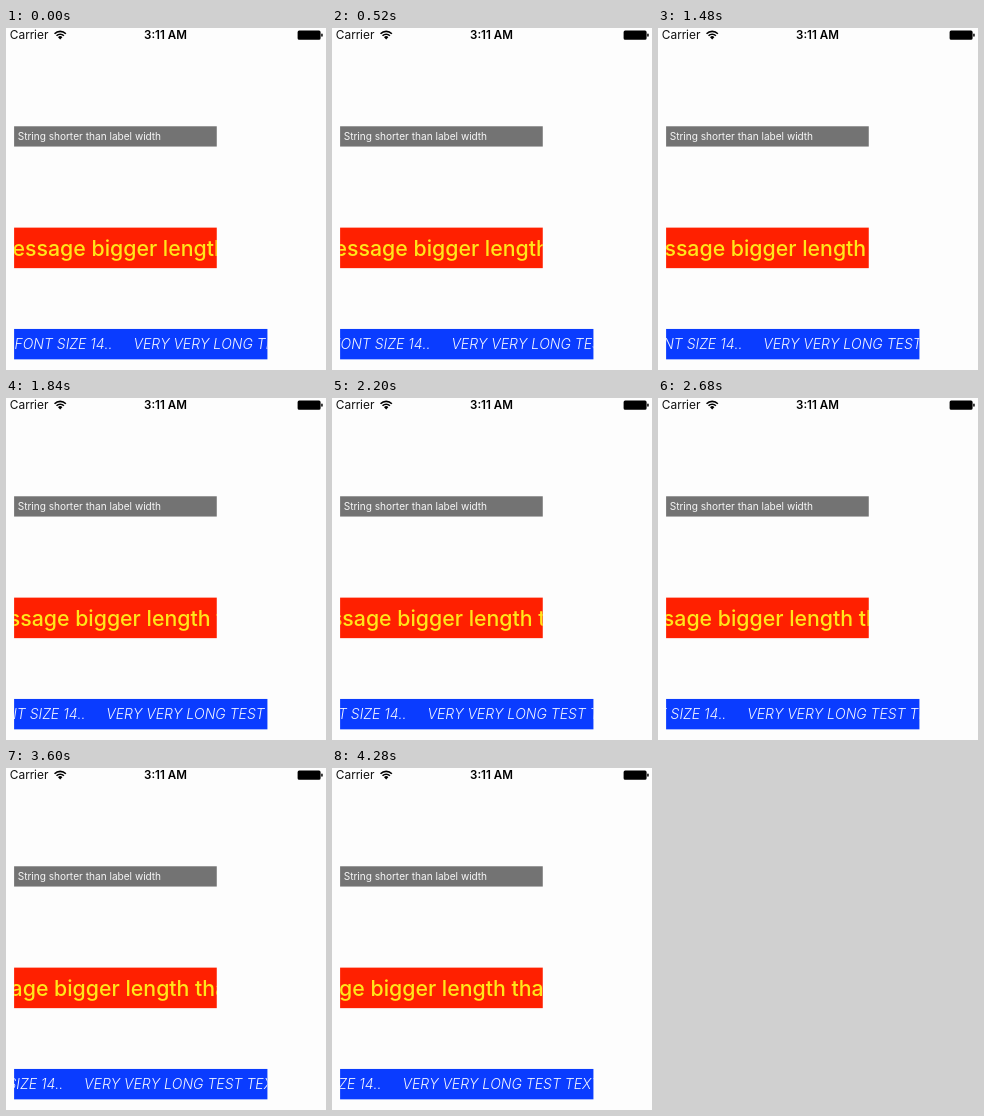
Write an HTML page with a canvas that moves like this. It is 320x342 px and loops after 4320 ms.

```html
<!DOCTYPE html>
<html lang="en">
<head>
<meta charset="utf-8">
<title>Marquee labels</title>
<style>
html, body { margin: 0; width: 100%; height: 100%; overflow: hidden; background: #fdfdfd; }
canvas { display: block; width: 320px; height: 342px; }
</style>
</head>
<body>
<canvas id="stage" width="320" height="342"></canvas>
<script>
const ctx = document.getElementById('stage').getContext('2d');
const FAMILY = 'Inter, "Liberation Sans", Arial, sans-serif';
const LOOP = 4320;
const STEP = 40;
const SCALE = 1.0133; // layout points to pixels

function text(str, x, y, font, color, align = 'left') {
  ctx.font = `${font} ${FAMILY}`;
  ctx.fillStyle = color;
  ctx.textAlign = align;
  ctx.fillText(str, x, y);
}

// Coloured box, measured in points, that clips whatever is drawn inside it
function label(y, w, h, color, drawText) {
  const box = [8, y, w, h].map(v => v * SCALE);
  ctx.save();
  ctx.fillStyle = color;
  ctx.fillRect(...box);
  ctx.beginPath();
  ctx.rect(...box);
  ctx.clip();
  drawText();
  ctx.restore();
}

function wifi(x, y) {
  const from = -Math.PI * 0.75, to = -Math.PI * 0.25;
  ctx.strokeStyle = ctx.fillStyle = '#000';
  ctx.lineWidth = 1.6;
  for (const r of [8, 5.2]) {
    ctx.beginPath();
    ctx.arc(x, y, r, from, to);
    ctx.stroke();
  }
  ctx.beginPath();
  ctx.moveTo(x, y);
  ctx.arc(x, y, 3.1, from, to);
  ctx.fill();
}

function battery() {
  ctx.fillStyle = '#000';
  ctx.beginPath();
  ctx.roundRect(291.6, 2.6, 23, 9.2, 1.6);
  ctx.roundRect(315.2, 5.6, 1.5, 3.2, 0.8);
  ctx.fill();
}

function statusBar() {
  text('Carrier', 3.8, 11.4, '11.9px', '#111');
  wifi(54.2, 11.4);
  text('3:11 AM', 159.5, 11.4, '600 11.6px', '#000', 'center');
  battery();
}

function draw(ms) {
  const t = ms / 1000;
  // The red label speeds up, the blue one slows down
  const redX = 85.5 - 7.27 * t - 0.867 * t * t;
  const blueX = 127.5 - 15.84 * t + 0.59 * t * t;

  ctx.fillStyle = '#fdfdfd';
  ctx.fillRect(0, 0, 320, 342);
  ctx.fontKerning = 'none';
  statusBar();

  label(97, 200, 20, '#737373', () =>
    text('String shorter than label width', 11.7, 112, '10.1px', '#f6f6f6'));

  label(197, 200, 40, '#ff2000', () => {
    const font = '500 21.3px', color = '#ffe61a';
    text('Message ', redX, 227.8, font, color, 'right');
    text('bigger length than', redX, 227.8, font, color);
  });

  label(297, 250, 30, '#0a3cff', () => {
    const font = 'italic 300 14px', color = '#f4f6ff';
    text('FONT SIZE 14..', blueX - 21, 321.2, font, color, 'right');
    text('VERY VERY LONG TEST TEXT', blueX, 321.2, font, color);
  });
}

function frame() {
  const ms = performance.now() % LOOP;
  draw(Math.floor(ms / STEP) * STEP);
  requestAnimationFrame(frame);
}
frame();
</script>
</body>
</html>
```
